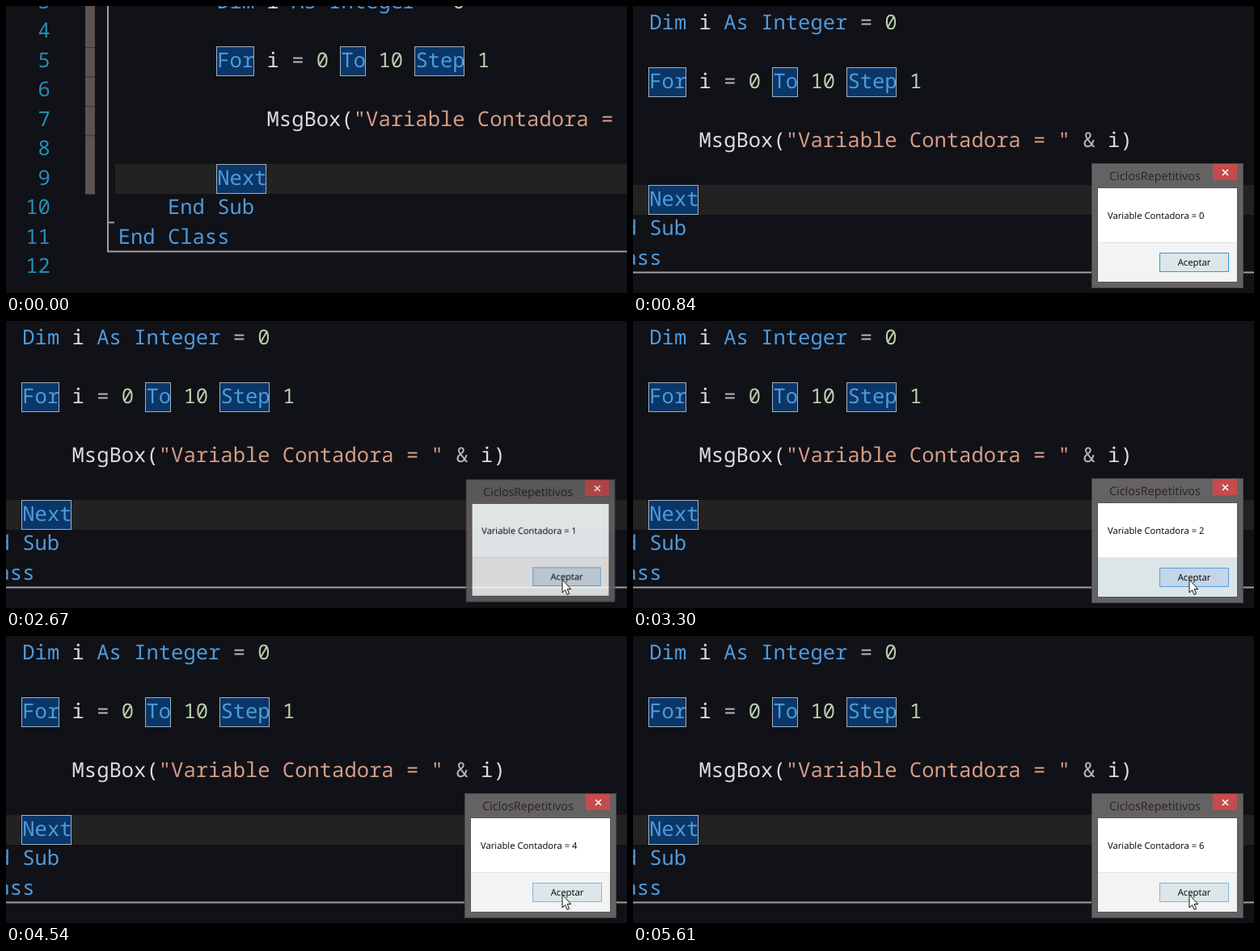
Animation, 768 px wide and 356 px high, one loop 6.07 s. Source, as an HTML page with a canvas:

```html
<!DOCTYPE html>
<html lang="es">
<head>
<meta charset="utf-8">
<title>For Next</title>
<style>
html, body { margin: 0; width: 100%; height: 100%; overflow: hidden; background: #111118; }
canvas { display: block; }
</style>
</head>
<body>
<canvas id="stage" width="768" height="356"></canvas>
<script>
const LOOP = 6070;
const PAN = { start: 390, end: 720, x: -241.5, y: 26 };
const FIRST_OPEN = 840;
// [button pressed, next dialog fully open]
const CLICKS = [[1560, 1990], [2490, 2820], [3180, 3480], [3910, 4240], [4540, 4910], [5310, 5610]];
const FADE = 120, CLOSE_LEAD = 170;

const CHAR = 15.32, ROW = 36.45, CODE_X = 138.7;
const KEY = '#4f9bdc', PLAIN = '#dcdcdc', NUM = '#b8d0aa', STR = '#d69d85', OP = '#b4b4b4';
const MONO = '500 25.53px "Noto Sans Mono", monospace';
const UI = '"Open Sans", sans-serif';

// row, column, text, colour, highlighted
const TOKENS = [
  [3, 8, 'Dim', KEY], [3, 12, 'i', PLAIN], [3, 14, 'As', KEY], [3, 17, 'Integer', KEY],
  [3, 25, '=', OP], [3, 27, '0', NUM],
  [5, 8, 'For', KEY, true], [5, 12, 'i', PLAIN], [5, 14, '=', OP], [5, 16, '0', NUM],
  [5, 18, 'To', KEY, true], [5, 21, '10', NUM], [5, 24, 'Step', KEY, true], [5, 29, '1', NUM],
  [7, 12, 'MsgBox(', PLAIN], [7, 19, '"Variable Contadora = "', STR],
  [7, 43, '&', OP], [7, 45, 'i)', PLAIN],
  [9, 8, 'Next', KEY, true],
  [10, 4, 'End Sub', KEY],
  [11, 0, 'End Class', KEY]
];

const ctx = document.getElementById('stage').getContext('2d');
const layer = document.createElement('canvas');
layer.width = 768;
layer.height = 356;
const layerCtx = layer.getContext('2d');

const progress = (t, start, end) => Math.min(1, Math.max(0, (t - start) / (end - start)));
const smooth = p => p * p * (3 - 2 * p);
const mix = (a, b, p) => `rgb(${a.map((v, i) => Math.round(v + (b[i] - v) * p))})`;
const baseline = row => 75.8 + (row - 5) * ROW;

function rect(c, x, y, w, h, fill) {
  c.fillStyle = fill;
  c.fillRect(x, y, w, h);
}

function label(c, text, x, y, fill, font, align = 'left') {
  c.font = font;
  c.textRendering = 'geometricPrecision';
  c.textAlign = align;
  c.fillStyle = fill;
  c.fillText(text, x, y);
}

function drawEditor(t) {
  const p = smooth(progress(t, PAN.start, PAN.end));
  rect(ctx, 0, 0, 768, 356, '#111118');
  ctx.save();
  ctx.translate(Math.round(PAN.x * p), Math.round(PAN.y * p));

  rect(ctx, 98, -40, 12, 273.5, '#5c5352');
  for (const row of [4, 5, 6, 7]) rect(ctx, 98, 51 + (row - 4) * ROW, 12, 1, '#383334');
  for (let row = 2; row <= 12; row++) label(ctx, row, 54.8, baseline(row), '#2490b8', MONO, 'right');

  rect(ctx, 135, 196, 900, 37, '#222222');
  rect(ctx, 125, -40, 2, 345, '#a0a0a0');
  rect(ctx, 125, 267.5, 9, 2, '#a0a0a0');
  rect(ctx, 125, 303.5, 910, 2, '#a0a0a0');

  for (const [row, col, text, colour, boxed] of TOKENS) {
    const x = CODE_X + col * CHAR, y = baseline(row);
    if (boxed) {
      const box = [Math.round(x) - .5, Math.round(y - 25.8) + .5, Math.round(text.length * CHAR), 36];
      rect(ctx, ...box, '#0a3768');
      ctx.strokeStyle = '#9fb0c2';
      ctx.lineWidth = 1;
      ctx.strokeRect(...box);
    }
    label(ctx, text, x, y, colour, MONO);
  }
  ctx.restore();
}

function paintDialog(value, hover, press, tinted, closing) {
  const c = layerCtx;
  c.clearRect(0, 0, 768, 356);
  rect(c, 567, 195, 188, 155, '#4b4848');
  rect(c, 568, 196, 186, 153, '#646262');
  label(c, 'CiclosRepetitivos', 589, 216, '#2a2324', '14.4px ' + UI);

  rect(c, 717, 196, 30, 20, '#c64b4d');
  c.strokeStyle = '#fff';
  c.lineWidth = 1.6;
  c.beginPath();
  c.moveTo(729, 203); c.lineTo(736, 210);
  c.moveTo(736, 203); c.lineTo(729, 210);
  c.stroke();

  rect(c, 574, 225, 174, 118, '#575555');
  rect(c, 575, 226, 172, 67, closing ? '#f9ffff' : '#fff');
  rect(c, 575, 293, 172, 49, tinted ? '#dce6e8' : '#f3f3f3');
  if (!tinted) rect(c, 575, 293, 172, 1, '#dfdfdf');
  label(c, 'Variable Contadora = ' + value, 587, 264, '#000', '500 11.25px ' + UI);

  rect(c, 651, 306, 86, 24, mix([221, 230, 233], [196, 213, 231], press));
  c.strokeStyle = press ? mix([126, 184, 222], [86, 157, 229], press)
                        : mix([51, 153, 221], [126, 184, 222], hover);
  c.lineWidth = 1;
  c.strokeRect(651.5, 306.5, 85, 23);
  label(c, 'Aceptar', 694, 322, '#000', '500 11.3px ' + UI, 'center');
}

function showDialog(visible, ...state) {
  if (visible <= 0) return;
  paintDialog(...state);
  const hidden = 1 - visible, scale = 1 - .1 * hidden;
  ctx.save();
  ctx.globalAlpha = 1 - hidden ** 1.25;
  ctx.translate(661, 272.5);
  ctx.scale(scale, scale);
  ctx.drawImage(layer, -661, -272.5);
  ctx.restore();
}

function drawDialogs(t) {
  const hover = progress(t, 1140, 1260);
  for (let value = 0; value <= CLICKS.length; value++) {
    const opened = value ? CLICKS[value - 1][1] : FIRST_OPEN;
    let visible = progress(t, opened - FADE, opened), press = 0, tinted = false, closing = false;
    if (value < CLICKS.length) {
      const [down, next] = CLICKS[value];
      const close = next - CLOSE_LEAD;
      closing = t > close;
      visible = Math.min(visible, 1 - progress(t, close, close + FADE));
      press = progress(t, down, down + 90) * (1 - progress(t, close, close + 40));
      tinted = press === 1;
    }
    showDialog(visible, value, hover, press, tinted, closing);
  }
}

function drawPointer(t) {
  if (t < 1020) return;
  const p = 1 - (1 - progress(t, 990, 1260)) ** 2;
  ctx.save();
  ctx.translate(688 + 12 * (1 - p), 321 + 36 * (1 - p));
  ctx.beginPath();
  for (const [x, y] of [[0, 0], [0, 16], [3.6, 12.6], [6, 18.4], [8.6, 17.3], [6.2, 11.6], [10.8, 11.6]]) ctx.lineTo(x, y);
  ctx.closePath();
  ctx.fillStyle = '#fff';
  ctx.fill();
  ctx.strokeStyle = '#111';
  ctx.lineWidth = 1;
  ctx.stroke();
  ctx.restore();
}

function render() {
  const t = performance.now() % LOOP;
  drawEditor(t);
  drawDialogs(t);
  drawPointer(t);
  requestAnimationFrame(render);
}
render();
</script>
</body>
</html>
```
